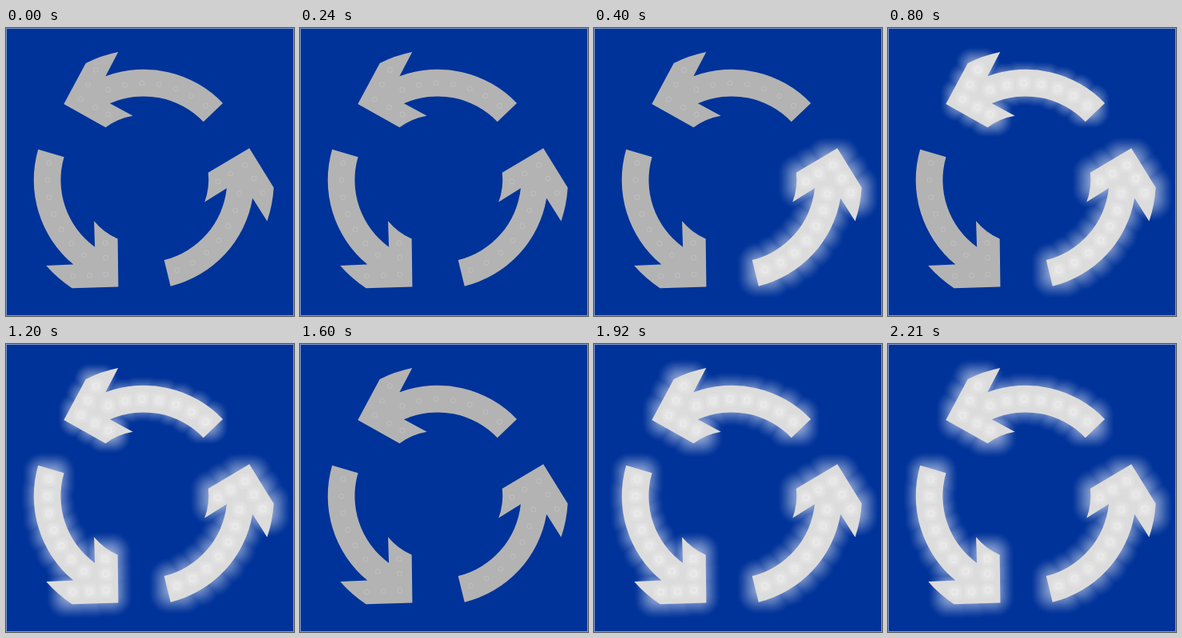
Recreate the animation shown at these times as an HTML page with a canvas. Size 360 by 360 pixels, loop 2.4 s.

```html
<!DOCTYPE html>
<html lang="en">
<head>
<meta charset="utf-8">
<title>Roundabout sign</title>
<style>
  html, body { margin: 0; width: 100%; height: 100%; overflow: hidden; background: #003399; }
  canvas { display: block; width: 360px; height: 360px; }
</style>
</head>
<body>
<canvas id="stage" width="360" height="360"></canvas>
<script>
const ctx = document.getElementById('stage').getContext('2d');
const LOOP = 2400, STEP = 400, FLASH_START = 1920, FLASH_REACH = 34;
const CENTER = [172.3, 189.5];
const rad = degrees => degrees * Math.PI / 180;
const polar = (r, degrees) => [r * Math.cos(rad(degrees)), r * Math.sin(rad(degrees))];

// In the order they light up; reach is how far the glow spreads from a lamp.
const arrows = [
  { rotation: 120, reach: 36 },
  { rotation: 0, reach: 29 },
  { rotation: -120, reach: 34 }
];

// Lamps as [radius, angle]: seven along the shaft, five in the head.
const lamps = Array.from({ length: 7 }, (_, i) => [120, 248.4 + i * 10.3]);
lamps.push([92, 241.4], [108, 236], [127, 231.8], [137, 239.5], [149, 246.4]);

function arrowPath() {
  const path = new Path2D();
  const arc = (r, from, to) => path.arc(0, 0, r, rad(from), rad(to), from > to);
  path.moveTo(...polar(137, 223.3));
  arc(162, 243.5, 258.7);
  arc(137.2, 249.7, 316.2);
  arc(103.5, 316.2, 246);
  arc(80.3, 260.4, 233.7);
  path.closePath();
  return path;
}
const arrow = arrowPath();

// One soft square around every lamp, filled as a union so overlaps do not add up.
function fillHalos(points, size, alpha) {
  ctx.beginPath();
  for (const [x, y] of points) {
    ctx.roundRect(x - size, y - size, size * 2, size * 2, size * 0.7);
  }
  ctx.fillStyle = `rgba(255,255,255,${alpha})`;
  ctx.fill();
}

function drawGlow(points, reach) {
  for (let size = reach - 1; size > 8; size--) {
    fillHalos(points, size, 2 / reach * Math.sqrt(1 - size / reach));
  }
}

function drawArrow(rotation, reach) {
  const lit = reach > 0;
  const points = lamps.map(([r, angle]) => polar(r, angle + rotation));
  ctx.save();
  ctx.translate(...CENTER);
  ctx.translate(...polar(0.67, 243.4 + rotation));
  if (lit) drawGlow(points, reach);

  ctx.save();
  ctx.rotate(rad(rotation));
  ctx.fillStyle = lit ? '#dcdcdc' : '#b3b3b3';
  ctx.fill(arrow);
  ctx.restore();

  if (lit) for (let size = 10; size > 3; size -= 2) fillHalos(points, size, 0.08);
  ctx.lineWidth = 0.8;
  ctx.strokeStyle = lit ? '#f0f0f0' : '#c3c3c3';
  for (const [x, y] of points) {
    ctx.beginPath();
    ctx.arc(x, y, lit ? 4 : 3, 0, Math.PI * 2);
    ctx.stroke();
  }
  ctx.restore();
}

function glowReach(index, time) {
  if (time >= FLASH_START) return Math.max(FLASH_REACH, index === 0 ? arrows[0].reach : 0);
  const lit = time < 4 * STEP && time >= (index + 1) * STEP;
  return lit ? arrows[index].reach : 0;
}

function draw() {
  const time = performance.now() % LOOP;
  ctx.fillStyle = '#003399';
  ctx.fillRect(0, 0, 360, 360);
  ctx.lineWidth = 1;
  ctx.strokeStyle = '#7f99cc';
  ctx.strokeRect(0.5, 0.5, 359, 359);
  arrows.forEach(({ rotation }, index) => drawArrow(rotation, glowReach(index, time)));
  requestAnimationFrame(draw);
}
draw();
</script>
</body>
</html>
```
